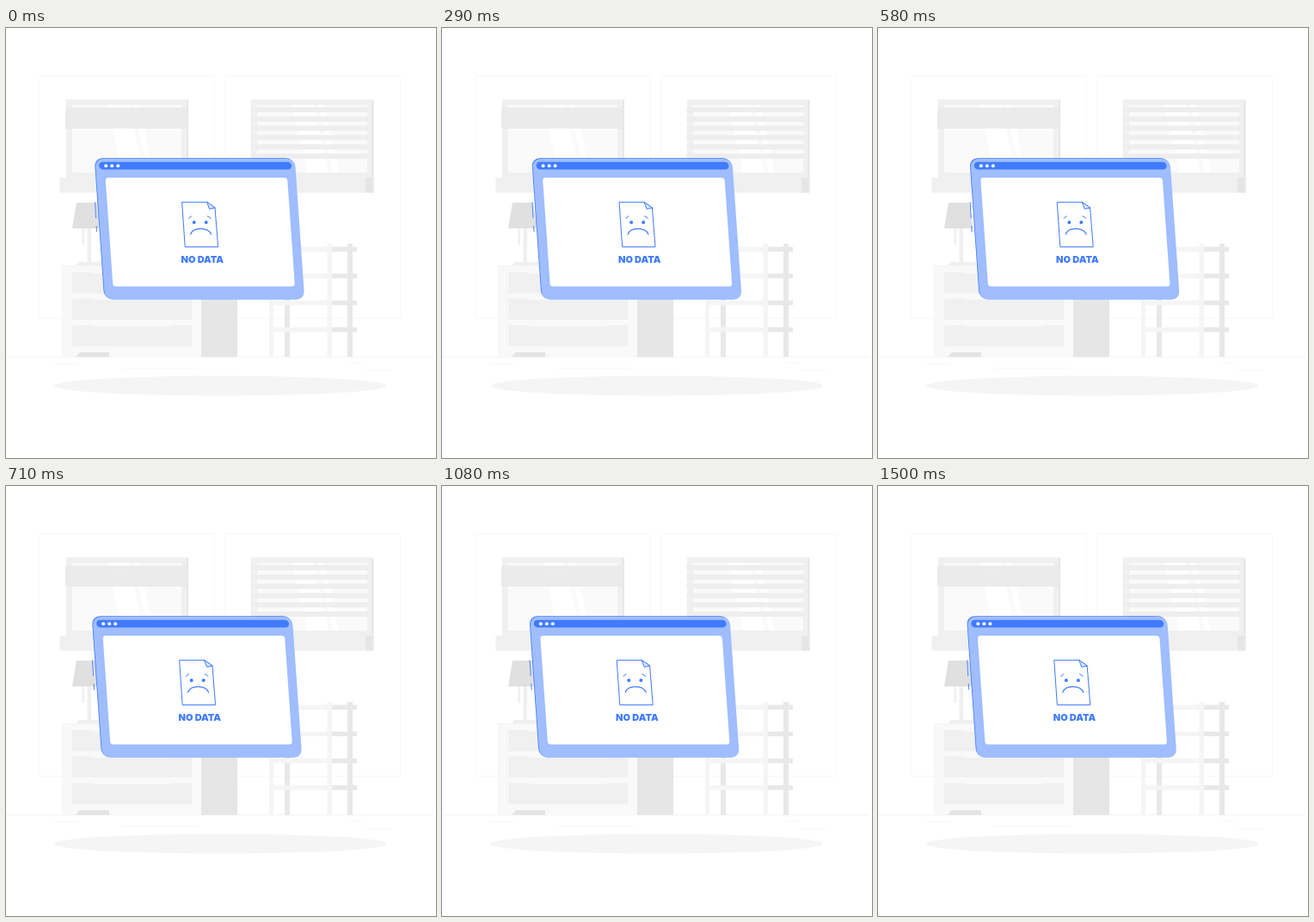
An HTML page for the animation above (1.54 s loop, 500x500 px).

```html
<!DOCTYPE html>
<html lang="en">
<head>
<meta charset="utf-8">
<title>No data</title>
<style>
  html, body { margin: 0; width: 100%; height: 100%; overflow: hidden; background: #fff; }
  svg { display: block; width: 100%; height: 100%; }
  text { font: 900 11px Inter, "Open Sans", sans-serif; }
</style>
</head>
<body>
<svg viewBox="0 0 500 500">
  <!-- walls and floor -->
  <g fill="#fff" stroke="#f7f7f7">
    <rect x="39" y="55.5" width="203.5" height="282" rx="2"/>
    <rect x="255" y="55.5" width="203.5" height="282" rx="2"/>
  </g>
  <path d="M0 382.5H497" stroke="#f1f1f1" stroke-width=".8"/>
  <path d="M56 390.5H84M134 395.5H224M400 389.5H416M416 398.5H448" stroke="#f6f6f6" stroke-width=".8"/>
  <ellipse cx="249.5" cy="416" rx="193.5" ry="11.5" fill="#f5f5f5"/>

  <!-- left window -->
  <path d="M62.5 174H211V191.5H62.5Z" fill="#f0f0f0"/>
  <path d="M70 83.5H212V174H70Z" fill="#e6e6e6"/>
  <path d="M70 83.5H210V174H70Z" fill="#f0f0f0"/>
  <path d="M77 89.5H204V168H77Z" fill="#fafafa"/>
  <path d="M118 89.5H143L160 168H135ZM148 89.5H155L172 168H165Z" fill="#fff"/>
  <g id="blind"></g>

  <!-- right window -->
  <path d="M278 174H427.5V191.5H278Z" fill="#f0f0f0"/>
  <path d="M418 174H427.5V191.5H418Z" fill="#e6e6e6"/>
  <path d="M285.5 83.5H427.5V174H285.5Z" fill="#e6e6e6"/>
  <path d="M285.5 83.5H425.5V174H285.5Z" fill="#f0f0f0"/>
  <path d="M292 89.5H420V168H292Z" fill="#fafafa"/>
  <path d="M333 89.5H358L375 168H350ZM363 89.5H370L387 168H380Z" fill="#fff"/>
  <g id="slats"></g>

  <!-- lamp -->
  <path d="M94.5 233H99V273H94.5ZM88.3 233H91V252H88.3ZM84 272H114V276.5H81.5Z" fill="#f0f0f0"/>
  <path d="M82 203H106L111 233H77Z" fill="#e0e0e0"/>

  <!-- dresser -->
  <path d="M227 276H269V382.5H227Z" fill="#e6e6e6"/>
  <path d="M65.5 276H227V382.5H65.5Z" fill="#f9f9f9"/>
  <path d="M65.5 276.5H227M65.8 276V382.5M74.5 280V382.5" stroke="#f3f3f3" fill="none" stroke-width=".8"/>
  <path d="M86 377H120V382.5H81Z" fill="#e4e4e4"/>
  <g id="drawers" fill="#f0f0f0"></g>

  <!-- shelf -->
  <path d="M324 251H330V382.5H324ZM397 251H403V382.5H397Z" fill="#e8e8e8"/>
  <g id="boards"></g>
  <path d="M306 251H311V382.5H306ZM373.5 251H379V382.5H373.5Z" fill="#f5f5f5"/>

  <!-- shaking browser window -->
  <g id="win">
    <g transform="matrix(1 0 .07 1 -10.6 0)">
      <rect x="102.7" y="151.3" width="232.3" height="164" rx="9.5" fill="#407bff"/>
      <rect x="103.5" y="152" width="232.3" height="163.8" rx="9.5" fill="#9fbdff"/>
      <rect x="107.6" y="155.7" width="223.8" height="8.9" rx="4.4" fill="#407bff"/>
      <rect x="114" y="174" width="211.5" height="126.5" rx="3.5" fill="#fff"/>
    </g>
    <path d="M103.5 202.5L104.6 221M105.1 230L105.6 237" stroke="#407bff" stroke-width=".9"/>
    <g fill="#fff">
      <circle cx="116.2" cy="160.2" r="2"/>
      <circle cx="123.2" cy="160.2" r="2"/>
      <circle cx="130.2" cy="160.2" r="2"/>
    </g>
    <g fill="none" stroke="#407bff" stroke-linejoin="round" stroke-linecap="round">
      <path d="M205 202.6H233.6L243 209.2L246.6 254.6H208.6Z"/>
      <path d="M233.6 202.6L236.6 210.4L243 209.2Z" fill="#d9e5ff"/>
      <path d="M212.5 221.5Q213.5 219.4 215.6 218.8M234.3 218.8Q236.9 219.3 238 221.5"/>
      <path d="M214.6 240C217.5 231.2 235 231.2 238.6 240" stroke-width="1.1"/>
    </g>
    <g fill="#407bff">
      <circle cx="218.7" cy="226" r="2"/>
      <circle cx="232.7" cy="226" r="2"/>
      <text x="228.3" y="273" text-anchor="middle">NO DATA</text>
    </g>
  </g>
</svg>
<script>
const $ = id => document.getElementById(id);
const box = (x, y, w, h, fill) =>
  `<rect x="${x}" y="${y}" width="${w}" height="${h}"${fill ? ` fill="${fill}"` : ""}/>`;
const fill = (id, list, draw) => { $(id).innerHTML = list.map(draw).join(""); };

fill("blind", [92.5, 96.5, 100.5, 104.5, 108.5, 112.5], y => box(69, y, 142, 4, "#ebebeb") + box(69, y + 3.4, 142, .6, "#e6e6e6"));
fill("slats", [92, 102.8, 113.6, 124.4, 135.2, 146], y => box(284.5, y, 136.5, 6, "#eeeeee"));
fill("drawers", [284, 314.5, 345.5], y =>
  `<path d="M77 ${y}H100L103 ${y + 1.5}H190L193 ${y}H216V${y + 24.5}H77Z"/>`);
fill("boards", [254.5, 285.5, 316.8, 348], y => box(306, y, 73, 5.5, "#f5f5f5") + box(379, y, 29, 5.5, "#e8e8e8"));

const LOOP = 1540, SHAKE = 1500, STEP = 1000 / 24, LEAD = 27;
const keys = [0, -1, 2, -4, 4, -4, 4, -4, 2, -1, 0];

function shakeAt(ms) {
  const p = Math.min(ms / SHAKE, 1) * 10;
  const i = Math.min(Math.floor(p), 9);
  return keys[i] + (keys[i + 1] - keys[i]) * (p - i);
}

function render(t) {
  // motion advances at 24 steps per second
  const step = Math.min(Math.floor((t % LOOP + 4.9) / STEP), 36);
  const dx = shakeAt(step * STEP + LEAD) + .18;
  $("win").setAttribute("transform", `translate(${dx.toFixed(3)} 0)`);
}

let start;
function tick(now) {
  start ??= now;
  render(now - start);
  requestAnimationFrame(tick);
}
render(0);
requestAnimationFrame(tick);
</script>
</body>
</html>
```
